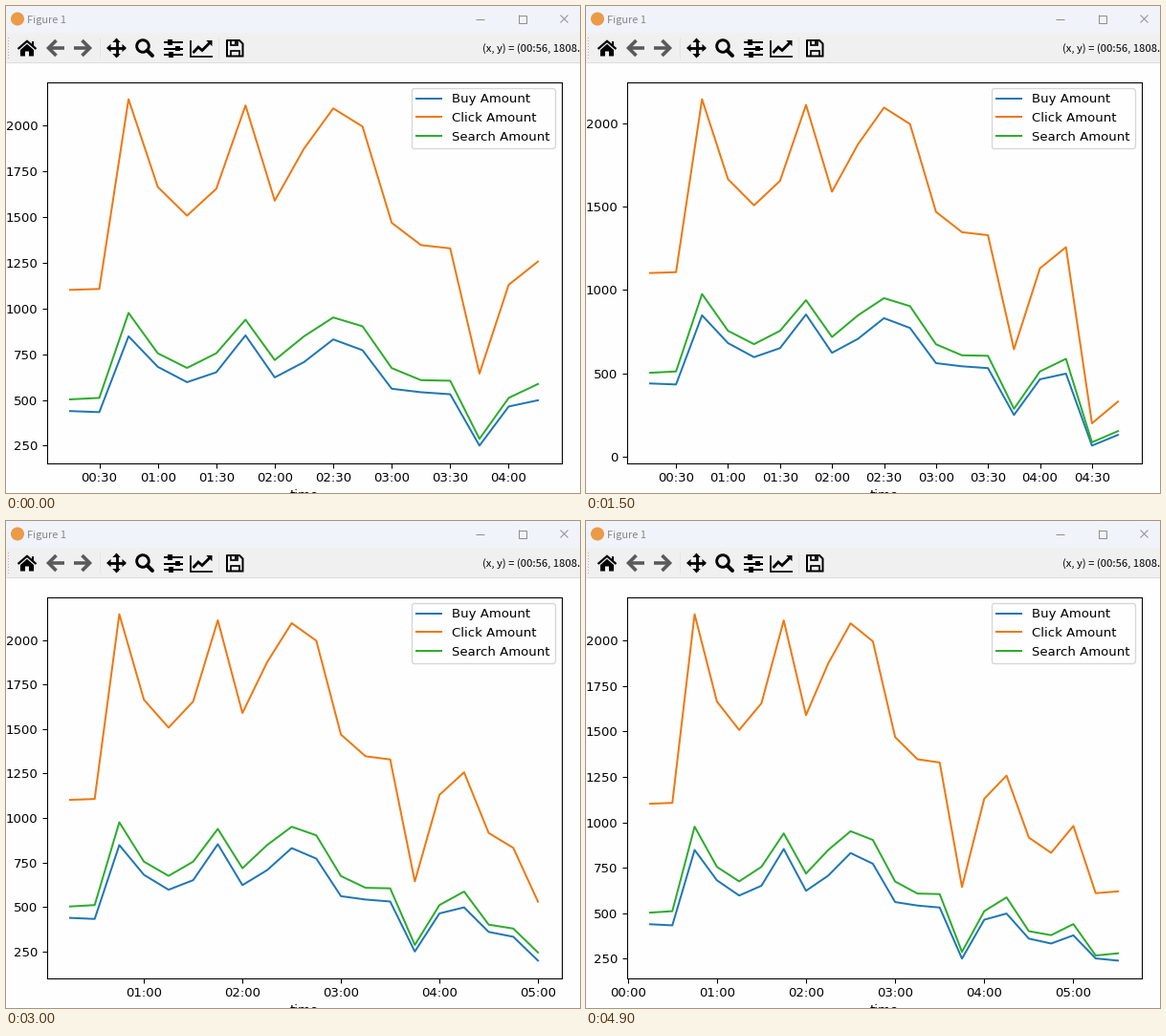
These frames come from a looping animation (600 by 510 pixels, 5000 ms). A matplotlib script:

```python
import matplotlib.pyplot as plt
from matplotlib.animation import FuncAnimation
from matplotlib.patches import Circle, Polygon, Rectangle
from matplotlib.ticker import FuncFormatter, MultipleLocator

W, H, DPI = 600, 510, 96
FRAMES, INTERVAL = 50, 100
PX = 72 / DPI
SCALE = 0.995

plt.rcParams.update({
    "toolbar": "None",
    "font.family": "DejaVu Sans",
    "font.size": 10 * SCALE,
    "axes.linewidth": 0.8 * SCALE,
    "lines.linewidth": 1.5 * SCALE,
    "patch.linewidth": SCALE,
    "axes.labelpad": 4 * SCALE,
})
for axis in ("xtick", "ytick"):
    plt.rcParams[axis + ".major.size"] = 3.5 * SCALE
    plt.rcParams[axis + ".major.pad"] = 3.5 * SCALE
    plt.rcParams[axis + ".major.width"] = 0.8 * SCALE

# One value per 15-minute window, the first at 00:15
BUY = [439, 433, 848, 681, 597, 651, 853, 623, 707, 831, 772, 561, 542,
       531, 250, 464, 498]
CLICK = [1102, 1107, 2145, 1665, 1508, 1655, 2111, 1590, 1875, 2095, 1996,
         1469, 1347, 1329, 644, 1130, 1257]
SEARCH = [503, 511, 976, 755, 675, 755, 939, 718, 848, 951, 903, 674, 608,
          605, 287, 511, 587]

# (time in ms, window index, (buy, click, search))
UPDATES = [
    (400, 17, (66, 200, 86)),
    (1000, 18, (130, 330, 153)),
    (1600, 17, (360, 916, 401)),
    (2200, 18, (333, 832, 379)),
    (2700, 19, (199, 530, 245)),
    (3400, 20, (251, 610, 267)),
    (4000, 19, (378, 980, 440)),
    (4500, 21, (239, 620, 279)),
]

fig = plt.figure(figsize=(W / DPI, H / DPI), dpi=DPI, facecolor="#fefefe")

# Window chrome, in pixel coordinates
ui = fig.add_axes([0, 0, 1, 1])
ui.set(xlim=(0, W), ylim=(H, 0))
ui.axis("off")


def stroke(pts, color="black", width=1, cap="butt"):
    xs, ys = zip(*pts)
    ui.plot(xs, ys, color=color, lw=width * PX, solid_capstyle=cap,
            solid_joinstyle="miter")


def fill(pts, color="black"):
    ui.add_patch(Polygon(pts, closed=True, fc=color, ec="none"))


def box(x, y, w, h, color="black"):
    ui.add_patch(Rectangle((x, y), w, h, fc=color, ec="none"))


def label(x, y, text, size, color):
    ui.text(x, y, text, family="Noto Sans CJK JP", fontsize=size * PX,
            color=color, va="baseline")


def title_bar():
    box(0, 0, W, 28, "#f0f3f9")
    ui.add_patch(Circle((12, 13.5), 7, fc="#eb9a45", ec="none"))
    label(22, 18, "Figure 1", 11, "#868789")
    grey = "#8d8e91"
    stroke([(491, 13.5), (500, 13.5)], grey)
    stroke([(535.5, 9.5), (543.5, 9.5), (543.5, 17.5), (535.5, 17.5),
            (535.5, 9)], grey)
    stroke([(579.5, 9.5), (587.5, 17.5)], grey)
    stroke([(587.5, 9.5), (579.5, 17.5)], grey)


def arrow(cx, side):
    grey = "#5a5a5a"
    tip = cx + side * 7.5
    stroke([(tip - side * 8, 36), (tip, 44), (tip - side * 8, 52)], grey, 3.6)
    stroke([(cx - side * 9, 44), (tip - side, 44)], grey, 3.6)


def home():
    stroke([(12.5, 45), (22, 36.8), (31.5, 45)], width=2.2)
    fill([(22, 39.8), (29, 46), (29, 52.5), (24, 52.5), (24, 47.5),
          (20, 47.5), (20, 52.5), (15, 52.5), (15, 46)])
    box(26.5, 36.5, 2.8, 5)


def pan():
    stroke([(107, 44), (124, 44)], width=2.8)
    stroke([(115.5, 36), (115.5, 52)], width=2.8)
    for s in (-1, 1):
        fill([(115.5 + s * 10.5, 44), (115.5 + s * 6, 39.8),
              (115.5 + s * 6, 48.2)])
        fill([(115.5, 44 + s * 10.5), (111.3, 44 + s * 6),
              (119.7, 44 + s * 6)])


def zoom():
    ui.add_patch(Circle((143, 42), 6.3, fill=False, ec="black", lw=2.9 * PX))
    stroke([(147.5, 46.5), (153, 52)], width=4, cap="round")


def sliders():
    for y, x in ((38, 171), (44.5, 179), (51, 172.5)):
        stroke([(165, y), (185, y)], width=2)
        box(x - 2.5, y - 2.7, 5, 5.4)


def line_chart():
    stroke([(193.2, 35.5), (193.2, 52.5), (216, 52.5)], width=1.7)
    stroke([(195.5, 49), (201, 43), (205, 46.5), (213, 38.5)], width=2.8)
    fill([(215.5, 36), (215.5, 42.2), (209.3, 36)])


def disk():
    stroke([(231, 36), (244, 36), (247.5, 39.5), (247.5, 52.5), (231, 52.5),
            (231, 35.2)], width=2)
    stroke([(234.5, 36), (234.5, 41), (242, 41), (242, 36)], width=1.7)
    box(238.8, 36, 2.6, 4)
    stroke([(234.5, 52), (234.5, 46.5), (244, 46.5), (244, 52)], width=1.7)


def toolbar():
    box(0, 28, W, 30.5, "#f0f0f0")
    stroke([(0, 58.5), (W, 58.5)], "#dcdcdc")
    for y in range(33, 56, 3):
        box(1.5, y, 1.2, 1.2, "#b4b4b4")
    for x in (97.5, 221.5):
        stroke([(x, 33), (x, 55)], "#e4e4e4")
    home()
    arrow(52, -1)
    arrow(80, 1)
    pan()
    zoom()
    sliders()
    line_chart()
    disk()
    label(497.5, 48, "(x, y) = (00:56, 1808.", 11.3, "black")


title_bar()
toolbar()

# Chart
ax = fig.add_axes([42.5 / W, (H - 478.5) / H, 538 / W, 399 / H],
                  facecolor="#fefefe")
names = ("Buy Amount", "Click Amount", "Search Amount")
colors = ("#1f77b4", "#f0770e", "#2cac2c")
lines = [ax.plot([], [], color=c, label=n)[0] for n, c in zip(names, colors)]
ax.legend(loc="upper right")
ax.set_xlabel("time")
ax.xaxis.set_major_formatter(
    FuncFormatter(lambda m, _: f"{int(m) // 60:02d}:{int(m) % 60:02d}"))


def padded(lo, hi):
    pad = 0.05 * (hi - lo)
    return lo - pad, hi + pad


def series_at(ms):
    series = [list(BUY), list(CLICK), list(SEARCH)]
    for start, i, values in UPDATES:
        if ms >= start:
            for s, v in zip(series, values):
                s[i:i + 1] = [v]
    return series


def draw(frame):
    series = series_at(frame * INTERVAL)
    minutes = [15 * (i + 1) for i in range(len(series[0]))]
    for line, s in zip(lines, series):
        line.set_data(minutes, s)
    left, right = padded(minutes[0], minutes[-1])
    ax.set_xlim(left, right)
    ax.set_ylim(*padded(min(map(min, series)), max(map(max, series))))
    # Ticks turn hourly once the axis spans five hours
    ax.xaxis.set_major_locator(
        MultipleLocator(60 if right - left >= 300 else 30))
    return lines


anim = FuncAnimation(fig, draw, frames=FRAMES, interval=INTERVAL,
                     init_func=lambda: draw(0), repeat=True, repeat_delay=0)
plt.show()
```
